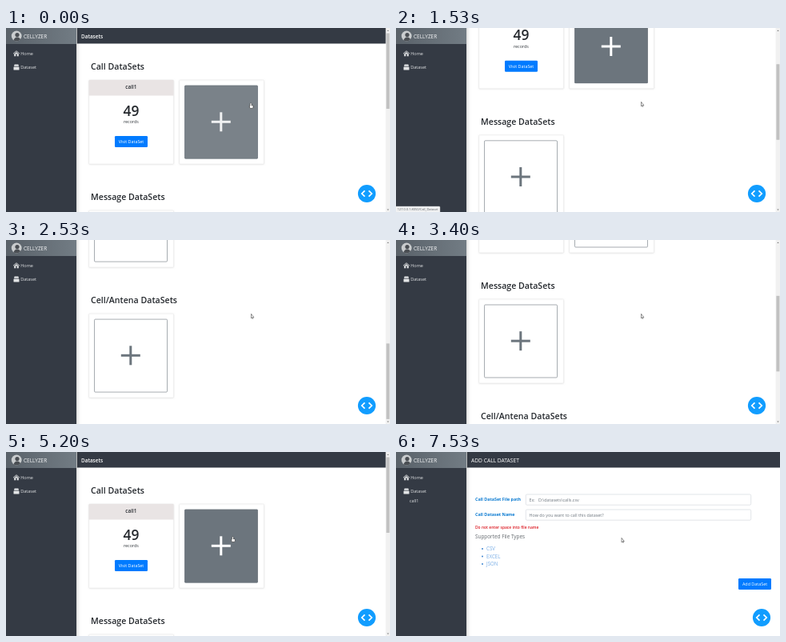
Animation of 480x230 px, one loop 8190 ms. Source, as an HTML page with a canvas:

```html
<!DOCTYPE html>
<html lang="en">
<head>
<meta charset="utf-8">
<title>Datasets</title>
<style>
  html, body { margin: 0; width: 100%; height: 100%; overflow: hidden; background: #fff; }
  canvas { display: block; width: 480px; height: 230px; }
</style>
</head>
<body>
<canvas id="stage"></canvas>
<script>
const W = 480, H = 230, LOOP = 8190, TICK = 1000 / 15;
const SIDEBAR = 88, BAR = 20, PITCH = 163, MAX_SCROLL = 299, FORM_OPENS = 6260;
const DARK = '#343a44', GREY = '#6c757d', BLUE = '#007bff', INK = '#24282d', PALE = '#e2e4e6';

const canvas = document.getElementById('stage');
const ctx = canvas.getContext('2d');
const dpr = window.devicePixelRatio || 1;
canvas.width = W * dpr;
canvas.height = H * dpr;
ctx.scale(dpr, dpr);

// Progress from 0 to 1 between two times.
const ramp = (t, from, to) => Math.min(1, Math.max(0, (t - from) / (to - from)));
const mix = (a, b, u) => a + (b - a) * u;

// Wheel down with growing speed, then back up to the top.
const scrollAt = t => t < 3000
  ? MAX_SCROLL * ramp(t, 1067, 2200) ** 1.3
  : MAX_SCROLL * (1 - ramp(t, 3267, 3600)) ** 1.3;
const hoverAt = t => t < 3000
  ? mix(0.9, 1, ramp(t, 0, 67)) - ramp(t, 1600, 1800)
  : ramp(t, 4600, 4800);
const statusAt = t => t < 3000
  ? ramp(t, -200, 267) * (t > 60) - ramp(t, 2000, 2200)
  : ramp(t, 5400, 5600) - ramp(t, 6533, 6867);

function paint(path, fill, stroke, line) {
  if (fill) { ctx.fillStyle = fill; ctx.fill(path); }
  if (stroke) { ctx.strokeStyle = stroke; ctx.lineWidth = line; ctx.stroke(path); }
}

function box(x, y, w, h, fill, radius = 0, stroke, line = 0.5) {
  const path = new Path2D();
  path.roundRect(x, y, w, h, radius);
  paint(path, fill, stroke, line);
}

function disc(x, y, r, fill) {
  const path = new Path2D();
  path.arc(x, y, r, 0, Math.PI * 2);
  paint(path, fill);
}

// Chevron or triangle: the tip plus two ends offset by (dx, dy) and (ex, ey).
function wedge(x, y, dx, dy, ex, ey, fill, stroke, line) {
  const path = new Path2D();
  path.moveTo(x + dx, y + dy);
  path.lineTo(x, y);
  path.lineTo(x + ex, y + ey);
  paint(path, fill, stroke, line);
}

function text(str, x, y, size, color, weight = 400, align = 'left') {
  ctx.font = `${weight} ${size}px "Open Sans", "Noto Sans", sans-serif`;
  ctx.textAlign = align;
  ctx.fillStyle = color;
  ctx.fillText(str, x, y);
}

function withAlpha(alpha, drawPart) {
  ctx.save();
  ctx.globalAlpha = Math.max(0, alpha);
  drawPart();
  ctx.restore();
}

function button(label, x, y) {
  box(x, y, 41, 14, BLUE, 1.3);
  text(label, x + 20.5, y + 9, 5.4, '#fff', 500, 'center');
}

function card(x, y) {
  ctx.save();
  ctx.shadowColor = 'rgba(0,0,0,.1)';
  ctx.shadowBlur = 2 * dpr;
  ctx.shadowOffsetY = 0.5 * dpr;
  box(x, y, 106, 105, '#fff', 1.2, '#e6e6e6', 0.4);
  ctx.restore();
}

function addCard(x, y, hover = 0, focus = 0) {
  card(x, y);
  const left = x + 6.6, top = y + 6.8, size = 91.6;
  withAlpha(focus * 0.5, () => box(left - 0.5, top - 0.5, size + 1, size + 1, null, 1.6, GREY, 1.2));
  withAlpha(hover, () => box(left, top, size, size, GREY, 1.2));
  box(left + 0.3, top + 0.3, size - 0.6, size - 0.6, null, 1.2, GREY, 0.6);
  const [r, g, b] = [108, 117, 125].map(c => mix(c, 255, hover));
  const color = `rgb(${r},${g},${b})`;
  const cx = x + 52.2, cy = y + 52.3;
  box(cx - 12, cy - 1.5, 24, 3, color);
  box(cx - 1.5, cy - 12, 3, 24, color);
}

function callCard(x, y) {
  card(x, y);
  box(x, y, 106, 19.5, '#e9e4e4', [1.2, 1.2, 0, 0]);
  const mid = x + 52.8;
  text('call1', mid, y + 11.3, 6.4, INK, 600, 'center');
  text('49', mid, y + 44.5, 17.4, INK, 600, 'center');
  text('records', mid, y + 54, 5.35, '#33383d', 400, 'center');
  button('Visit DataSet', x + 32.4, y + 70);
}

function header(title, size, weight) {
  box(SIDEBAR + 0.8, 0, W, BAR - 0.5, DARK);
  text(title, 94, 13, size, '#fff', weight);
}

function scrollbar(scroll) {
  box(474.6, 0, 6, H, '#f1f1f1');
  box(475.4, 6.5 + scroll * 0.411, 4, 94.5, '#c1c1c1');
  wedge(477.5, 2.6, -1.2, 1.4, 1.2, 1.4, '#777');
  wedge(477.5, 227.9, -1.2, -1.4, 1.2, -1.4, '#777');
}

function datasetsPage(t) {
  const scroll = scrollAt(t);
  ctx.save();
  ctx.translate(0, -scroll);
  header('Datasets', 6.4, 600);
  ['Call DataSets', 'Message DataSets', 'Cell/Antena DataSets'].forEach((title, i) => {
    text(title, 106, 52 + i * PITCH, 10.6, INK, 600);
    if (i) addCard(103.6, 65 + i * PITCH);
  });
  callCard(103.6, 65);
  addCard(216.6, 65, hoverAt(t), ramp(t, 5867, 6133));
  ctx.restore();
  scrollbar(scroll);
}

function field(label, hint, y) {
  text(label, 99, y + 8.4, 5.35, '#0a7ad1', 700);
  box(162.3, y, 281.4, 13.2, '#fff', 1.4, '#ced4da', 0.6);
  text(hint, 166.5, y + 8.6, 5.4, GREY);
}

function formPage() {
  header('ADD CALL DATASET', 6.7, 400);
  field('Call DataSet File path', 'Ex:   D:\\datasets\\calls.csv', 53);
  field('Call Dataset Name', 'How do you want to call this dataset?', 72);
  text('Do not enter space into file name', 99, 96, 4.95, '#dc1c24', 600);
  text('Supported File Types', 99, 107.8, 6.4, '#63686d');
  ['CSV', 'EXCEL', 'JSON'].forEach((type, i) => {
    const y = 121 + i * 9.5;
    disc(108, y, 1, '#3f86d0');
    text(type, 113, y + 2.2, 6.2, '#7aaee6');
  });
  button('Add DataSet', 428, 158);
}

function avatar() {
  ctx.save();
  ctx.beginPath();
  ctx.arc(13.2, 10, 6.4, 0, Math.PI * 2);
  ctx.clip();
  box(6, 3, 15, 14, '#c9ccce');
  disc(14, 8.6, 2.6, '#4a4e53');
  disc(14, 16.2, 4.6, '#4a4e53');
  ctx.restore();
}

function sidebar(showDataset) {
  ctx.save();
  ctx.shadowColor = 'rgba(0,0,0,.3)';
  ctx.shadowBlur = 5 * dpr;
  box(0, -10, SIDEBAR, H + 20, DARK);
  ctx.restore();
  const strip = ctx.createLinearGradient(0, 0, SIDEBAR, 0);
  strip.addColorStop(0, '#596169');
  strip.addColorStop(1, '#727c84');
  box(0, 0, SIDEBAR, BAR, strip);
  avatar();
  text('CELLYZER', 22, 12.6, 6.5, '#f5f6f7');

  wedge(13, 28.7, -4, 3.5, 4, 3.5, null, PALE, 0.9);
  wedge(13, 30, -2.8, 2.4, 2.8, 2.4, PALE);
  box(10.2, 32.3, 2.1, 3, PALE);
  box(13.7, 32.3, 2.1, 3, PALE);
  text('Home', 18.3, 34, 5.5, PALE);
  box(10.2, 45.4, 5.6, 2.4, PALE, [1, 1, 0, 0]);
  box(9.5, 48.4, 7, 4, PALE, 0.5);
  text('Dataset', 18.3, 50.8, 5.5, PALE);
  if (showDataset) text('call1', 17, 63, 5.4, PALE);
}

function debugButton(x) {
  const y = 207;
  disc(x, y, 11.1, '#119dff');
  for (const side of [-1, 1]) {
    wedge(x + side * 6.2, y, -side * 3.7, -3.6, -side * 3.7, 3.6, null, '#fff', 1.7);
  }
}

function statusBar() {
  box(-1, 223, 56, 8, '#f0f1f2', [0, 1, 0, 0], '#cbcdd0', 0.4);
  text('127.0.0.1:8050/Call_Dataset', 1.8, 228.4, 3.95, '#5f6368');
}

function cursor(x, y, hand) {
  ctx.save();
  ctx.translate(x, y);
  if (hand) {
    box(-1.3, -3.2, 1.6, 5, '#fff', 0.8, '#222', 0.6);
    box(-2.1, -0.5, 4.6, 3.9, '#fff', 1.2, '#222', 0.6);
    box(-1, -2.8, 1, 4, '#fff', 0.5);
  } else {
    paint(new Path2D('M0-2.6V2.8L1 1.8L1.8 3.4L2.5 3L1.8 1.5H3.3Z'), '#fff', '#222', 0.5);
  }
  ctx.restore();
}

function draw(now) {
  const t = Math.floor((now % LOOP + 4) / TICK) * TICK;
  const onForm = t >= FORM_OPENS;
  box(0, 0, W, H, '#fff');
  if (onForm) formPage(); else datasetsPage(t);
  sidebar(onForm);
  debugButton(onForm ? 457 : 451);
  withAlpha(statusAt(t), statusBar);

  const hand = t < 1430 || (t > 4650 && !onForm);
  const move = ramp(t, 4600, 5250);
  cursor(mix(306.5, 282, move), mix(hand ? 97 : 95, 110, move), hand);
}

const start = performance.now();
function loop() {
  draw(performance.now() - start);
  requestAnimationFrame(loop);
}
loop();
</script>
</body>
</html>
```
